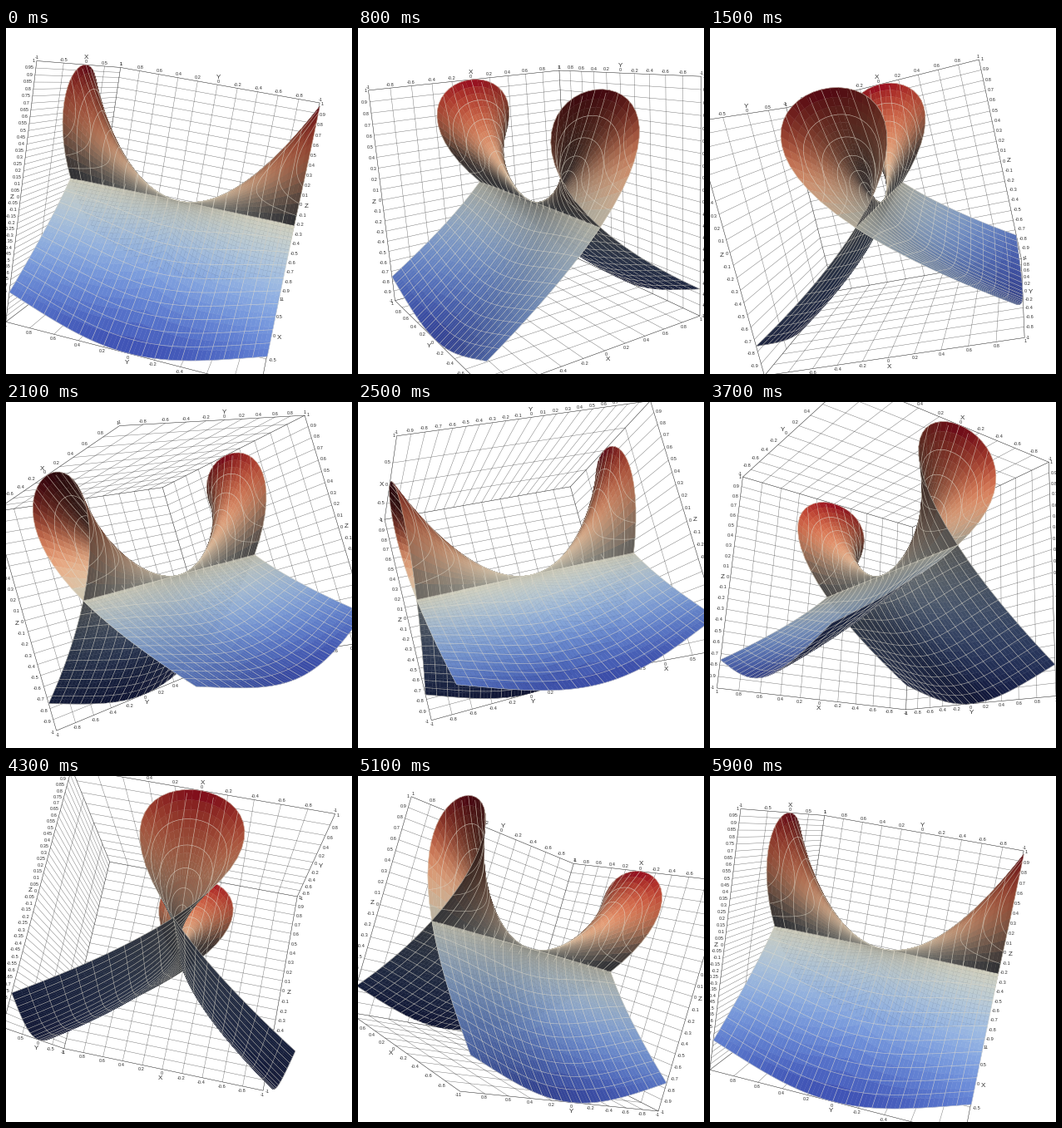
A matplotlib script that plays this animation: 416 by 416 pixels, repeating every 6 s.

```python
"""Orbit around the self-crossing surface x^2 = z^2 (y^2 - z) in a labelled box."""
import numpy as np
import matplotlib.pyplot as plt
from matplotlib.animation import FuncAnimation
from matplotlib.collections import LineCollection, PolyCollection

SIZE, FRAMES = 416, 60
MID = SIZE / 2
PX = 0.72                                # points per pixel at 100 dpi
FOCAL = MID / np.tan(np.radians(15))
DIST = 5.57
PITCH = 0.017


def unit(v):
    v = np.asarray(v, float)
    return v / (np.linalg.norm(v, axis=-1, keepdims=True) + 1e-12)


# The camera circles the origin around a tilted axis.
POLE = unit([0.19, 0.205, 0.95])
SIDE0 = unit(np.cross(POLE, [-0.96, -0.17, 0.225]))
DIR0 = np.cross(SIDE0, POLE)


def camera(i):
    """Return the right, up and towards-viewer vectors."""
    a = 2 * np.pi * i / (FRAMES - 1)
    level = DIR0 * np.cos(a) + SIDE0 * np.sin(a)
    up = POLE * np.cos(PITCH) + level * np.sin(PITCH)
    toward = level * np.cos(PITCH) - POLE * np.sin(PITCH)
    return np.cross(up, toward), up, toward


def project(p, cam):
    side, up, toward = cam
    k = FOCAL / (DIST - p @ toward)
    return np.stack([MID + k * (p @ side), MID - k * (p @ up)], axis=-1)


# ---- surface ----
def point(y, t):
    z = y * y - t * t
    return np.stack(np.broadcast_arrays(t * z, y, z), axis=-1)


def sheet_t(y, c):
    """Solve t (t^2 - y^2) = c by Newton's method."""
    t = np.full_like(y, 1.5)
    for _ in range(40):
        t = t - (t * (t * t - y * y) - c) / (3 * t * t - y * y)
    return t


def quads(g):
    q = np.stack([g[:-1, :-1], g[1:, :-1], g[1:, 1:], g[:-1, 1:]], axis=2)
    return q.reshape(-1, 4, 3)


def segments(p):
    return np.stack([p[:-1], p[1:], p[1:], p[:-1]], axis=1)


def build_surface():
    y = np.linspace(-1, 1, 61)[:, None]
    s = np.linspace(0, 1, 25)[None, :]
    flap = np.abs(y) + (sheet_t(y, 1.0) - np.abs(y)) * s
    grids = [point(y, y * np.linspace(-1, 1, 33)[None, :]),
             point(y, flap), point(y, -flap)]
    faces = np.concatenate([quads(g) for g in grids])

    # lines of constant y
    lines = [segments(row) for g in grids for row in g[::3]]
    # lines of constant x
    ys = np.linspace(-1, 1, 41)
    lines += [segments(point(ys, 0 * ys)), segments(point(ys, ys))]
    ts = np.linspace(0.01, 1, 160)
    for c in np.arange(1, 11) / 10:
        edge = sheet_t(ys, c)
        yl = np.sqrt(ts * ts + c / ts)
        keep = yl <= 1
        for sign in (1, -1):
            lines.append(segments(point(ys, sign * edge)))
            if keep.sum() > 1:
                for half in (1, -1):
                    lines.append(segments(point(half * yl[keep], sign * ts[keep])))
    return faces, np.concatenate(lines)


FACES, LINES = build_surface()
ITEMS = np.concatenate([FACES, LINES])
CENTERS = ITEMS.mean(axis=1)
NF = len(FACES)
NORMALS = unit(np.cross(FACES[:, 2] - FACES[:, 0], FACES[:, 3] - FACES[:, 1]))
BASE = plt.get_cmap("coolwarm")((CENTERS[:NF, 2] + 1) / 2)[:, :3]
LIGHT_UP, LIGHT_VIEW = 0.6, 0.8
AMBIENT = np.array([0.22, 0.23, 0.25])
KEY = np.array([0.72, 0.70, 0.60])
LINE_RGBA = (0.88, 0.86, 0.80, 0.68)
WIDTHS = np.where(np.arange(len(ITEMS)) < NF, 0.35, 0.65) * PX


def shade(up, toward):
    view = unit(DIST * toward - CENTERS[:NF])
    facing = np.sum(NORMALS * view, axis=1)
    rise = (NORMALS @ up) * np.sign(facing)
    light = np.maximum(LIGHT_UP * rise + LIGHT_VIEW * np.abs(facing), 0)
    return np.clip(BASE * (AMBIENT + KEY * light[:, None]), 0, 1)


# ---- box, grid and labels ----
def spacing(axis, top, span):
    dx, dy = np.abs(span)
    if axis == 2:
        return 0.05 if dy > 311.5 else 0.1
    upright = dy >= 0.9 * dx
    if max(dx, dy) < (83 if upright and axis == 1 else 130):
        return 0.5
    return 0.1 if axis == 1 and top and dx > 290 else 0.2


def outer_edges(toward):
    """Yield axis, running axis and corner of each outline edge."""
    back = -np.sign(toward)
    for axis in range(3):
        for run in range(3):
            if run != axis:
                corner = back.copy()
                corner[run] = -back[run]
                yield axis, run, corner


def box_parts(cam):
    grid, labels = [], []
    for axis, run, corner in outer_edges(cam[2]):
        ends = np.array([corner, corner])
        ends[:, axis] = -1, 1
        a, b = project(ends, cam)
        step = spacing(axis, corner[2] > 0, b - a)
        values = np.linspace(-1, 1, int(round(2 / step)) + 1)
        near = np.tile(corner, (len(values), 1))
        near[:, axis] = values
        far = near.copy()
        far[:, run] *= -1
        p, q = project(near, cam), project(far, cam)
        grid += list(np.stack([p, q], axis=1)) + [np.array([a, b])]

        out = unit([a[1] - b[1], b[0] - a[0]])
        if out @ ((a + b) / 2 - MID) < 0:
            out = -out
        for value, pos in zip(values, p):
            text = f"{round(value, 2) + 0:g}"
            gap = 1.7 + 1.4 * len(text) * abs(out[0]) + 2.3 * abs(out[1])
            labels.append((text, pos + out * gap, 5.7))
        labels.append(("XYZ"[axis], p[len(p) // 2] + out * 10, 8))
    return grid, labels


# ---- figure ----
fig = plt.figure(figsize=(SIZE / 100, SIZE / 100), dpi=100, facecolor="white")
ax = fig.add_axes([0, 0, 1, 1])
ax.set_xlim(0, SIZE)
ax.set_ylim(SIZE, 0)
ax.axis("off")

grid_art = LineCollection([], colors=[(0.15, 0.15, 0.15, 0.65)],
                          linewidths=0.45 * PX, zorder=1)
surface_art = PolyCollection([], closed=True, zorder=3)
ax.add_collection(grid_art, autolim=False)
ax.add_collection(surface_art, autolim=False)
pool = [ax.text(0, 0, "", ha="center", va="center_baseline", color="#303030",
                family="Liberation Sans", zorder=2) for _ in range(150)]


def draw(i):
    cam = camera(i)
    side, up, toward = cam
    grid, labels = box_parts(cam)
    grid_art.set_segments(grid)

    depth = np.linalg.norm(CENTERS - DIST * toward, axis=1)
    depth[NF:] -= 0.05                   # lines sit just above their faces
    order = np.argsort(-depth)
    fill = np.zeros((len(ITEMS), 4))
    fill[:NF, :3] = shade(up, toward)
    fill[:NF, 3] = 1
    edge = fill.copy()
    edge[NF:] = LINE_RGBA
    surface_art.set_verts(project(ITEMS, cam)[order])
    surface_art.set_facecolor(fill[order])
    surface_art.set_edgecolor(edge[order])
    surface_art.set_linewidth(WIDTHS[order])

    shown = [l for l in labels if np.all((l[1] > -8) & (l[1] < SIZE + 8))]
    for art in pool:
        art.set_visible(False)
    for art, (text, pos, size) in zip(pool, shown):
        art.set_text(text)
        art.set_position(pos)
        art.set_fontsize(size * PX)
        art.set_visible(True)
    return [grid_art, surface_art, *pool]


anim = FuncAnimation(fig, draw, frames=FRAMES, interval=100, init_func=lambda: draw(0),
                     repeat=True, repeat_delay=0, blit=False)
plt.show()
```
